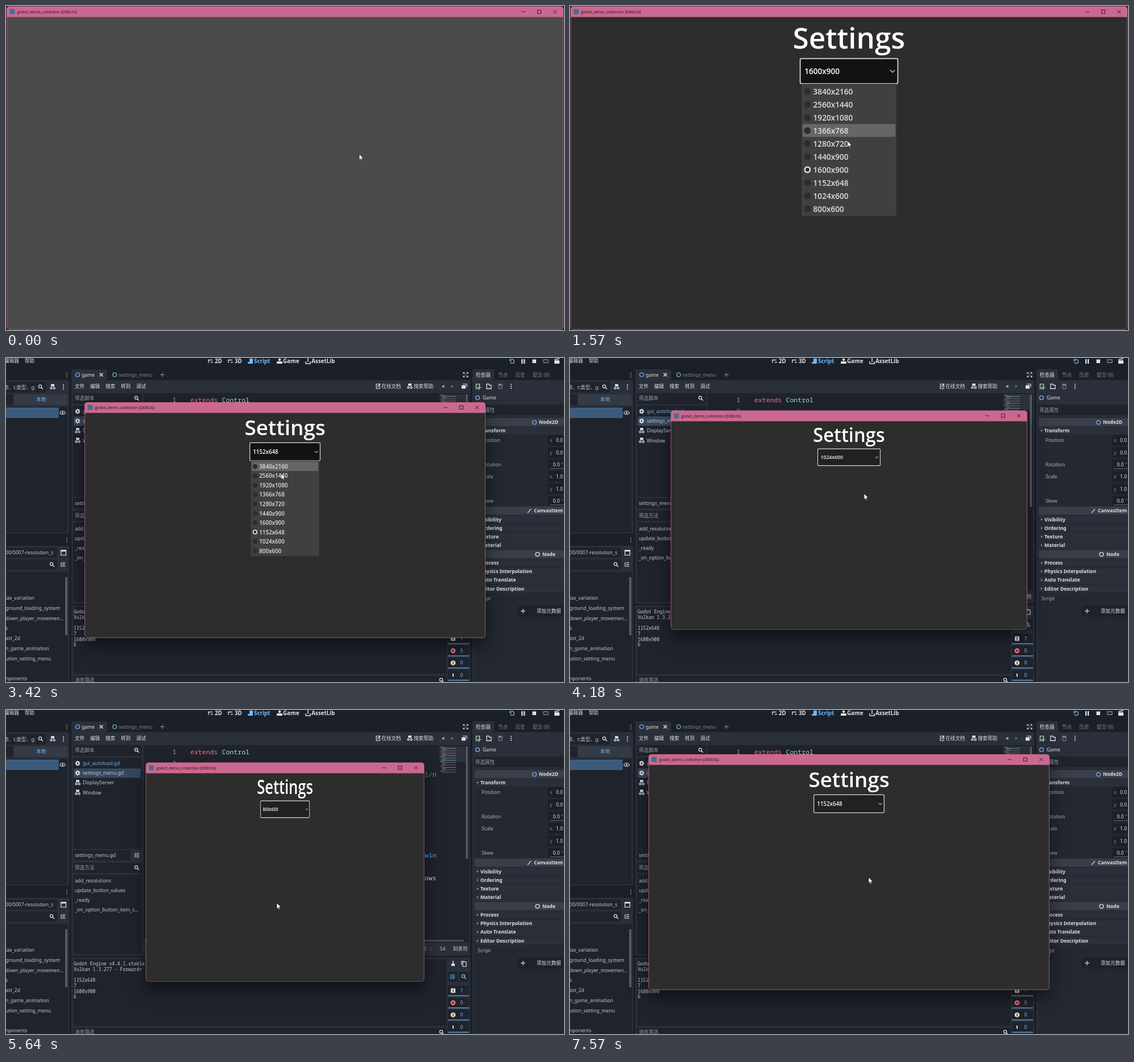
Animation, 981 px wide and 571 px high, one loop 7640 ms. Source, as an HTML page with a canvas:

```html
<!DOCTYPE html>
<html lang="en">
<head>
<meta charset="utf-8">
<title>Resolution settings</title>
<style>
html, body { margin: 0; width: 100%; height: 100%; overflow: hidden; background: #1c2028; }
canvas { display: block; width: 981px; height: 571px; }
</style>
</head>
<body>
<canvas id="stage" width="981" height="571"></canvas>
<script>
const ctx = document.getElementById('stage').getContext('2d');
const LOOP = 7640, STEP = 70, SCALE = 0.612;
const UI = '"Noto Sans", "Noto Sans CJK SC", "Noto Sans CJK", sans-serif';
const MONO = '"Noto Sans Mono", "DejaVu Sans Mono", monospace';
const GAME = '"Open Sans", sans-serif';
const PINK = '#cb6890', BLUE = '#70bafa', LIGHT = '#dfe1e5', SOFT = '#c3c7ce', DIM = '#7f858f';
const OUTER = '#1b1f27', PANEL = '#2a2f3a', FIELD = '#1f232c', BAR = '#393e49';

const SIZES = ['3840x2160', '2560x1440', '1920x1080', '1366x768', '1280x720',
  '1440x900', '1600x900', '1152x648', '1024x600', '800x600'];
const ROW_TOP = 140.5, ROW_H = 27;

// Start of each run of movement; time advances in STEPs inside a run.
const RUNS = [0, 330, 730, 2400, 3080, 4040, 5640, 7220];
const RESIZES = [[0, 6], [2400, 7], [4040, 8], [5350, 9], [7220, 7]];
const CHOICES = [[0, 6], [2470, 7], [4110, 8], [5420, 9], [7290, 7]];
const POPUPS = [[1150, 2470], [3220, 4110], [4600, 5420], [6190, 7290]];
const POINTER = [
  [0, 621, 261], [730, 621, 261], [940, 535, 126], [1080, 498, 116], [1220, 492, 122],
  [1360, 485, 170], [1430, 485, 178], [1500, 486, 214], [1570, 488, 238], [1780, 484, 270],
  [2060, 474, 303], [2200, 472, 311], [2400, 472, 311], [2540, 482, 270], [2810, 488, 168],
  [2880, 487, 166], [3220, 487, 167], [3430, 482, 222], [3640, 477, 290], [3840, 475, 325],
  [4040, 475, 325], [4110, 498, 286], [4180, 517, 239], [4390, 498, 178], [4600, 492, 175],
  [4870, 486, 242], [5220, 476, 340], [5640, 476, 340], [5780, 490, 262], [5990, 495, 176],
  [6190, 490, 174], [6330, 484, 197], [6470, 484, 206], [6750, 482, 265], [7020, 480, 309],
  [7220, 480, 309], [7360, 502, 304], [7570, 525, 295], [LOOP, 525, 295]];

const latest = (list, t) => list.filter(e => e[0] <= t).pop()[1];

function pointerAt(t) {
  const i = Math.max(1, POINTER.findIndex(k => k[0] > t));
  const [t0, x0, y0] = POINTER[i - 1], [t1, x1, y1] = POINTER[i];
  const f = Math.max(0, (t - t0) / (t1 - t0));
  return [x0 + (x1 - x0) * f, y0 + (y1 - y0) * f];
}

function text(s, x, y, color = SOFT, size = 8.57, weight = 400, family = UI, align = 'left') {
  ctx.font = `${weight} ${size}px ${family}`;
  ctx.textAlign = align;
  ctx.fillStyle = color;
  ctx.fillText(s, x, y + size * 0.36);
}
const bold = (s, x, y, color = LIGHT, size = 8.57) => text(s, x, y, color, size, 700);
const code = (s, x, y, color, size = 11.55) => text(s, x, y, color, size, 400, MONO);

function box(x0, y0, x1, y1, color, r = 0) {
  ctx.fillStyle = color;
  ctx.beginPath();
  ctx.roundRect(x0, y0, x1 - x0, y1 - y0, r);
  ctx.fill();
}

function line(points, color = SOFT, width = 1.2, closed = false) {
  ctx.beginPath();
  points.forEach(([x, y]) => ctx.lineTo(x, y));
  if (closed) ctx.closePath();
  ctx.strokeStyle = color;
  ctx.lineWidth = width;
  ctx.stroke();
}

function disc(x, y, r, color) {
  ctx.beginPath();
  ctx.arc(x, y, r, 0, 7);
  ctx.fillStyle = color;
  ctx.fill();
}

function ring(x, y, r, color = SOFT, width = 1.3, from = 0, to = Math.PI * 2) {
  ctx.beginPath();
  ctx.arc(x, y, r, from, to);
  ctx.strokeStyle = color;
  ctx.lineWidth = width;
  ctx.stroke();
}

const icon = {
  dots(x, y, c = LIGHT) { [-3.5, 0, 3.5].forEach(d => disc(x, y + d, 1.1, c)); },
  search(x, y, c = LIGHT) { ring(x - 1, y - 1, 2.6, c); line([[x + 1, y + 1], [x + 4, y + 4]], c, 1.5); },
  cross(x, y, c = LIGHT, d = 3, w = 1.5) {
    line([[x - d, y - d], [x + d, y + d]], c, w);
    line([[x - d, y + d], [x + d, y - d]], c, w);
  },
  plus(x, y, c = LIGHT) { line([[x - 4, y], [x + 4, y]], c); line([[x, y - 4], [x, y + 4]], c); },
  rows(x, y, c = LIGHT) {
    [-3, 0, 3].forEach(d => line([[x - 1, y + d], [x + 4, y + d]], c, 1.2));
    line([[x - 3, y - 4], [x - 3, y + 4]], c, 1.2);
  },
  gear(x, y, c = LIGHT) {
    ring(x, y, 2.5, c, 1.9);
    for (let a = 0; a < 8; a++) {
      const u = Math.cos(a * Math.PI / 4), v = Math.sin(a * Math.PI / 4);
      line([[x + u * 3, y + v * 3], [x + u * 4.4, y + v * 4.4]], c, 1.5);
    }
  },
  page(x, y, c = LIGHT) { line([[x - 3, y - 4], [x + 3, y - 4], [x + 3, y + 4], [x - 3, y + 4]], c, 1.2, true); },
  doc(x, y, c = LIGHT) {
    box(x - 3, y - 5, x + 3, y - 1, c, 1);
    ring(x - 2.6, y + 2, 1.6, c);
    ring(x + 2.6, y + 2, 1.6, c);
  },
  arrows(x, y, c = LIGHT) {
    line([[x - 4, y + 3], [x - 4, y - 2], [x + 3, y - 2]], c, 1.4);
    line([[x, y + 2], [x + 4, y + 2]], c, 1.4);
  },
  angle(x, y, dx, dy, c = SOFT, w = 1) {
    line([[x - dx - dy, y - dy - dx], [x + dx, y + dy], [x - dx + dy, y - dy + dx]], c, w);
  }
};

function drawTopBar() {
  text('编辑器', -3, 5, LIGHT);
  text('帮助', 33, 5, LIGHT);
  [['2D', 367], ['3D', 402], ['Script', 436], ['Game', 487], ['AssetLib', 537]].forEach(([s, x]) => {
    const c = s === 'Script' ? BLUE : LIGHT;
    bold(s, x, 5.5, c, 9.8);
    if (s === 'Script') { box(x - 8, 1, x - 2, 10, c, 1); box(x - 11, 7, x - 4, 10, c, 1); }
    else if (s === 'Game') { disc(x - 6, 3, 2.2, c); box(x - 11, 6, x - 1, 10, c, 1); }
    else if (s === 'AssetLib') { line([[x - 6, 0], [x - 6, 7]], c, 1.5); line([[x - 10, 6], [x - 10, 10], [x - 2, 10], [x - 2, 6]], c, 1.5); }
    else icon.arrows(x - 7, 5.5, c);
  });
  ring(890, 6, 3.5, BLUE, 1.4, -2.5, 2.8);
  line([[886, 1], [886, 5], [889, 5]], BLUE, 1.2);
  box(906, 2, 908.3, 10, LIGHT); box(910, 2, 912.3, 10, LIGHT);
  box(925.5, 2.5, 932, 9, LIGHT);
  line([[945, 3], [953, 3], [953, 8], [945, 8]], DIM, 1.3, true);
  box(964, 4, 973, 10, LIGHT, 1);
  line([[964, 3], [973, 1]], LIGHT, 1.5);
}

function drawLeftDock() {
  icon.dots(107, 30, DIM);
  box(0, 39, 111, 309, PANEL, 2);
  box(0, 42, 70, 61, FIELD, 2);
  text('称、t:类型、g:', -4, 51.5);
  icon.search(61, 51);
  icon.doc(82, 51);
  icon.dots(101, 51);
  box(0, 64, 13, 83, FIELD); box(14, 64, 108, 83, '#343a46', 2);
  text('本地', 53, 73, BLUE);
  box(0, 86, 108, 307, FIELD, 2);
  box(0, 88, 92, 105, '#3b5a7c', 2);
  line([[0, 88], [92, 88], [92, 105], [0, 105]], '#55809f', 0.8);
  ctx.beginPath();
  ctx.ellipse(99.5, 96.5, 4.6, 3, 0, 0, 7);
  ctx.strokeStyle = LIGHT; ctx.lineWidth = 1.2; ctx.stroke();
  disc(99.5, 96.5, 1.5, LIGHT);

  icon.dots(107, 321, DIM);
  box(0, 331, 111, 571, PANEL, 2);
  box(0, 334, 90, 352, FIELD, 2);
  text('00/0007-resolution_s', -1, 343);
  box(96, 338.5, 106, 341, LIGHT);
  line([[96.6, 339], [105.4, 339], [105.4, 347.5], [96.6, 347.5]], LIGHT, 1.2, true);
  box(0, 355, 90, 373, FIELD, 2);
  icon.search(81, 364);
  icon.rows(100, 364);
  box(0, 377, 109, 571, FIELD, 2);
  [['lax_variation', 423], ['ground_loading_system', 441], ['down_player_movemen...', 458.5], ['s', 476],
   ['ast_2d', 494], ['n_game_animation', 511.5], ['ution_setting_menu', 529.5], ['nponents', 565]]
    .forEach(([s, y]) => text(s, -1, y));
  box(104, 386, 108, 489, '#555b67', 2);
}

function drawScriptPanel() {
  box(115, 20, 178, 40, PANEL, 2);
  ring(126, 29.5, 3.4, '#6fa8ee', 1.4);
  text('game', 133, 29.5, LIGHT);
  icon.cross(167.5, 29.5);
  ring(191, 29.5, 3.4, '#6bb58c', 1.4);
  text('settings_menu', 198, 29.5, DIM);
  icon.plus(275, 29.5, DIM);
  [[-1, -1], [1, -1], [-1, 1], [1, 1]].forEach(([u, v]) => {
    line([[808 + u, 29.5 + v], [808 + u * 4, 29.5 + v * 4]], LIGHT, 1);
    line([[808 + u * 1.5, 29.5 + v * 4], [808 + u * 4, 29.5 + v * 4], [808 + u * 4, 29.5 + v * 1.5]], LIGHT, 1);
  });
  box(115, 39, 816, 433, PANEL, 2);
  ['文件', '编辑', '搜索', '转到', '调试'].forEach((s, i) => text(s, 121 + 27 * i, 50, LIGHT));
  icon.page(654, 50); line([[653, 51], [658, 45]], LIGHT);
  text('在线文档', 660, 50, LIGHT);
  icon.doc(710, 50);
  text('搜索帮助', 717, 50, LIGHT);
  icon.angle(769, 50, -1.8, 0, LIGHT, 1.2);
  icon.angle(784, 50, 1.8, 0, DIM, 1.2);
  box(801, 48, 808, 54, LIGHT); line([[803, 46], [810, 46], [810, 51]], LIGHT);

  box(118, 62, 239, 81, FIELD, 2);
  text('筛选脚本', 121, 71, '#9a9fa8');
  icon.search(230, 71);
  box(118, 84, 239, 245, FIELD, 2);
  box(119, 103, 237, 119.5, '#36485e', 2);
  [['gui_autoload.gd', 94], ['settings_menu.gd', 111], ['DisplayServer', 128.3], ['Window', 145.5]].forEach(([s, y], i) => {
    (i < 2 ? icon.gear : icon.doc)(126, y);
    text(s, 135, y, i ? SOFT : '#70b4ea');
  });
  box(118, 247, 219, 265, FIELD, 2);
  text('settings_menu.gd', 121, 256);
  icon.rows(230, 256);
  box(118, 269, 239, 287, FIELD, 2);
  text('筛选方法', 121, 278, '#9a9fa8');
  icon.search(230, 278);
  box(118, 290, 239, 430, FIELD, 2);
  ['add_resolutions', 'update_button_values', '_ready', '_on_option_button_item_s...']
    .forEach((s, i) => text(s, 121, 300.5 + 17.2 * i));

  box(242, 62, 814, 410, FIELD);
  code('1', 292.5, 74, '#9ca1a9');
  code('2', 292.5, 94, '#9ca1a9');
  code('extends', 324, 74, '#ff7085');
  code('Control', 379.5, 74, '#8cefd4');
  code('l/H', 736, 114, '#5f9468');
  code('win', 736, 256, '#57b3ff');
  code('ows', 736, 296, '#cdcfd2');
  const tones = ['#a94f5f', '#4d7a58', '#5b82a8', '#80868f'];
  for (let i = 0; i < 22; i++) {
    const x = 763 + (i % 4 ? 3 : 0), w = 8 + (i * 17) % 34;
    box(x, 65 + i * 2.1, Math.min(x + w, 807), 66 + i * 2.1, tones[(i * 3 + (i >> 2)) % 4]);
  }
  box(762, 64, 808, 92, 'rgba(140,150,170,0.12)');
  box(808.5, 64, 812, 263, '#565c68', 2);
  box(243, 405, 805, 408, '#454b57', 1);
  code('21 :', 730, 421, SOFT, 8);
  code('54', 763, 421, SOFT, 8);
  text('制表符', 786, 421);
}

function drawOutput() {
  box(115, 436, 816, 571, PANEL, 2);
  box(118, 439, 775, 557, FIELD, 2);
  ['Godot Engine v4.4.1.stable', 'Vulkan 1.3.277 - Forward+ -', '', '1152x648', '7', '1600x900', '6']
    .forEach((s, i) => code(s, 119, 447 + 9.75 * i, '#cfd2d6', 8));
  box(118, 560, 775, 571, FIELD, 2);
  text('消息筛选', 121, 568, '#9a9fa8');
  icon.search(766, 568);
  box(783, 447, 789, 451, LIGHT); line([[786, 442], [786, 448]], LIGHT, 1.6);
  icon.page(806, 448); line([[801, 449], [801, 443], [806, 443]], LIGHT);
  box(778, 461, 795, 479, FIELD, 2); icon.rows(785, 470, BLUE);
  box(797, 461, 814, 479, FIELD, 2); icon.search(805, 470, BLUE);
  [['7', LIGHT], ['0', '#f4717c'], ['0', '#ede0b8'], ['0', LIGHT]].forEach(([n, c], i) => {
    const y = 494.5 + 21.4 * i;
    box(777, y - 9, 814, y + 9, FIELD, 2);
    box(777, y + 8.3, 814, y + 9.8, '#5b9bd0');
    if (i === 0) box(782, y - 4, 790, y + 4, c, 1);
    else if (i < 3) disc(786, y, 4.3, c);
    if (i === 1) icon.cross(786, y, FIELD, 1.6, 1.1);
    else line([[786, y - 2.8], [786, y + 2.8]], i === 3 ? c : FIELD, i === 3 ? 2 : 1.3);
    text(n, 798.5, y, BLUE);
  });
}

function drawInspector() {
  box(820, 20, 858, 40, PANEL, 2);
  [['检查器', 826, LIGHT], ['节点', 865, DIM], ['历史', 895.5, DIM], ['提交 (8)', 926, DIM]]
    .forEach(([s, x, c]) => text(s, x, 29.5, c));
  box(820, 39, 981, 571, PANEL);
  icon.page(829.5, 50); icon.plus(832, 52, '#6bd49a');
  line([[845, 54], [845, 46], [849, 46], [850, 48], [853, 48], [853, 54]], LIGHT, 1.3, true);
  icon.page(869, 50, DIM); box(867, 46, 871, 49, DIM);
  icon.dots(888, 50);
  ring(829, 70, 3.4, '#79b5f0', 1.4);
  text('Game', 838, 70, LIGHT);
  box(823, 82, 981, 101, FIELD, 2);
  text('筛选属性', 825, 91.5, '#9a9fa8');
  box(823, 104, 981, 571, '#232831');

  const header = (s, x, y) => { box(824, y - 7.2, 981, y + 7.2, BAR); bold(s, x, y); };
  header('Node2D', 937, 113); ring(929, 113.5, 3.4, '#79a9e8', 1.4);
  header('CanvasItem', 928, 269); line([[917, 273], [923, 266]], '#9da2ab', 2);
  header('Node', 943, 345.5); ring(934.5, 346, 3.4, LIGHT, 1.4);
  const group = (s, y) => {
    box(824, y - 6.8, 981, y + 6.8, '#2a2f39');
    if (s === 'Transform') icon.angle(829, y, 0, 1.1); else icon.angle(829, y, 1.1, 0);
    bold(s, 834, y);
  };
  group('Transform', 128);
  ['Visibility', 'Ordering', 'Texture', 'Material'].forEach((s, i) => group(s, 284.5 + 15.2 * i));
  ['Process', 'Physics Interpolation', 'Auto Translate', 'Editor Description'].forEach((s, i) => group(s, 361 + 15.2 * i));
  [['Position', 145, 'x', '0.0'], ['', 166.5, 'y', '0.0'], ['Rotation', 188, '', '0.0'],
   ['Scale', 209, 'x', '1.0'], ['', 230.5, 'y', '1.0'], ['Skew', 252, '', '0.0']].forEach(([s, y, axis, v]) => {
    text(s, 836, y, '#aeb3bb');
    box(953, y - 9, 981, y + 9, '#1b1f27', 2);
    text(axis, 956, y, DIM);
    text(v, axis ? 967 : 961.5, y, LIGHT);
    if (!axis) { text('°', 976, y, DIM); box(956, y + 6.5, 981, y + 7.3, DIM); }
  });
  text('Script', 829, 424, '#aeb3bb');
  box(900, 436.5, 981, 456, '#1d2129', 2);
  icon.plus(909, 446);
  text('添加元数据', 933, 446, LIGHT);
}

function drawEditor() {
  box(0, 0, 981, 571, OUTER);
  drawTopBar();
  drawLeftDock();
  drawScriptPanel();
  drawOutput();
  drawInspector();
}

function windowFrame(sizeIndex) {
  const [w, h] = SIZES[sizeIndex].split('x').map(n => n * SCALE);
  return { x: 490.5 - w / 2, y: 295 - h / 2, w, h, sx: w / 1152, sy: h / 648 };
}

function drawWindow({ x, y, w, h }, fill) {
  const top = y - 18.8, right = x + w;
  ctx.save();
  ctx.shadowColor = 'rgba(0,0,0,0.5)';
  ctx.shadowBlur = 30;
  ctx.shadowOffsetY = 14;
  box(x, top, right, y + h, PINK, 5);
  ctx.restore();
  box(x + 0.7, y, right - 0.7, y + h - 0.7, fill, [0, 0, 4, 4]);
  const mid = y - 9.5, ink = '#1c1218';
  box(x + 5.5, mid - 4.5, x + 14.5, mid + 4.5, '#42718f', 1);
  text('godot_demo_collection (DEBUG)', x + 18.6, mid + 0.2, ink, 7, 400, GAME);
  line([[right - 73.5, mid], [right - 67, mid]], ink, 0.9);
  ctx.strokeRect(right - 45.6, mid - 3, 6, 6);
  icon.cross(right - 14.7, mid, ink, 3, 0.9);
}

function drawPopup(hover, selected) {
  box(478, 138, 674, 412.5, '#404040', [0, 0, 2, 2]);
  SIZES.forEach((s, i) => {
    const top = ROW_TOP + ROW_H * i, mid = top + 13.8;
    if (i === hover) box(480, top, 672, top + ROW_H, '#666666', 3);
    if (i === selected) { disc(490, mid, 7, '#e0e0e0'); disc(490, mid, 4, '#2a2a2a'); }
    else disc(490, mid, 7, '#2d2d2d');
    text(s, 502, mid + 0.4, '#dfdfdf', 16, 600, GAME);
  });
}

function drawSettings(frame, t) {
  const toLocal = ([px, py]) => [(px - frame.x) / frame.sx, (py - frame.y) / frame.sy];
  const selected = latest(CHOICES, t);
  const open = POPUPS.some(([a, b]) => t >= a && t < b);
  const [bx, by] = toLocal(pointerAt(t));
  const over = bx > 476 && bx < 676 && by > 87 && by < 137;
  ctx.save();
  ctx.translate(frame.x, frame.y);
  ctx.scale(frame.sx, frame.sy);
  text('Settings', 576, 43.4, '#ffffff', 60, 600, GAME, 'center');
  box(476, 87, 676, 137, open ? '#121212' : over ? '#343434' : '#212121', 3);
  if (t >= 1080) {
    ctx.strokeStyle = 'rgba(255,255,255,0.82)';
    ctx.lineWidth = 2;
    ctx.beginPath();
    ctx.roundRect(475, 86, 202, 52, 3);
    ctx.stroke();
  }
  text(SIZES[selected], 484, 112, open ? '#ffffff' : over || t >= 1080 ? '#f2f2f2' : '#dfdfdf', 16, 600, GAME);
  line([[661, 109.7], [666, 114.5], [671, 109.7]], '#a6a6a6', 2);
  if (open) {
    const [hx, hy] = toLocal(pointerAt(t - STEP));
    const inside = hx > 478 && hx < 674;
    drawPopup(inside ? Math.floor((hy - ROW_TOP) / ROW_H) : -1, selected);
  }
  ctx.restore();
}

function drawPointer([x, y]) {
  ctx.save();
  ctx.translate(x, y);
  ctx.scale(SCALE, SCALE);
  ctx.beginPath();
  [[0, 0], [0, 17], [3.9, 13.4], [6.5, 19], [9.2, 17.8], [6.8, 12.3], [12, 12]].forEach(([a, b]) => ctx.lineTo(a, b));
  ctx.closePath();
  ctx.fillStyle = '#ffffff';
  ctx.strokeStyle = '#111111';
  ctx.lineWidth = 1.1;
  ctx.fill();
  ctx.stroke();
  ctx.restore();
}

function draw(time) {
  const run = RUNS.filter(r => r <= time).pop();
  const t = time - (time - run) % STEP;
  const size = latest(RESIZES, t);
  const frame = windowFrame(size);
  if (size === 6) box(0, 0, 981, 571, '#2a2029');
  else drawEditor();
  drawWindow(frame, t < 330 ? '#4b4b4b' : '#2d2d2d');
  if (t >= 330) drawSettings(frame, t);
  drawPointer(pointerAt(t));
}

const start = performance.now();
function tick() {
  draw((performance.now() - start) % LOOP);
  requestAnimationFrame(tick);
}
tick();
</script>
</body>
</html>
```
